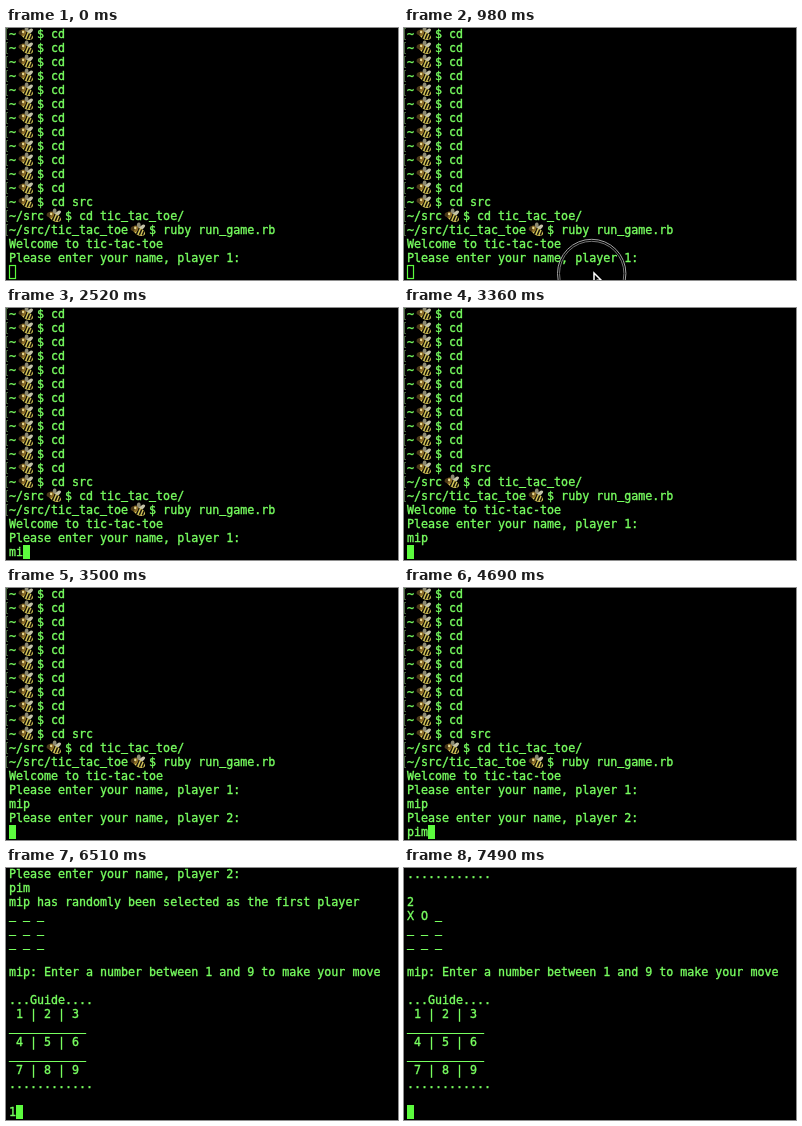
Animation of 392x252 px, one loop 8 s. Source, as an HTML page with a canvas:

```html
<!DOCTYPE html>
<html lang="en">
<head>
<meta charset="utf-8">
<title>Tic-tac-toe in a terminal</title>
<style>
  html, body { margin: 0; width: 100%; height: 100%; overflow: hidden; background: #000; }
  canvas { display: block; width: 392px; height: 252px; }
</style>
</head>
<body>
<canvas id="screen"></canvas>
<script>
const LOOP = 8000, ROWS = 18, CELL = 7.01, LINE = 14, LEFT = 2.9;
const GREEN = '#78ff60', CURSOR = '#5cfb3e';
const ONE = 'mip', TWO = 'pim';

const canvas = document.getElementById('screen');
const ctx = canvas.getContext('2d');
const ratio = window.devicePixelRatio || 1;
canvas.width = 392 * ratio;
canvas.height = 252 * ratio;
ctx.scale(ratio, ratio);

// '@' stands for the bee, two cells wide
const prompt = (dir, command) => `${dir}@ $ ${command}\n`;
const ask = n => `Please enter your name, player ${n}:\n`;
const guide = `...Guide....
 1 | 2 | 3
___________
 4 | 5 | 6
___________
 7 | 8 | 9
............

`;
const turn = (name, firstRow) =>
  `${firstRow}\n_ _ _\n_ _ _\n\n${name}: Enter a number between 1 and 9 to make your move\n\n${guide}`;

// What is added to the terminal, and when
const output = [
  [0, prompt('~', 'cd').repeat(12) + prompt('~', 'cd src') +
      prompt('~/src', 'cd tic_tac_toe/') +
      prompt('~/src/tic_tac_toe', 'ruby run_game.rb') +
      'Welcome to tic-tac-toe\n' + ask(1)],
  [2170, ONE[0]], [2450, ONE[1]], [2870, ONE[2]], [3220, '\n'],
  [3430, ask(2)],
  [4270, TWO[0]], [4480, TWO[1]], [4690, TWO[2]], [4900, '\n'],
  [5040, `${ONE} has randomly been selected as the first player\n` + turn(ONE, '_ _ _')],
  [6370, '1'], [6650, '\n'],
  [6720, turn(TWO, 'X _ _')],
  [7280, '2'],
  [7490, '\n' + turn(ONE, 'X O _')]
];

function ellipse(color, x, y, rx, ry, angle = 0) {
  ctx.fillStyle = color;
  ctx.beginPath();
  ctx.ellipse(x, y, rx, ry, angle, 0, 7);
  ctx.fill();
}

function bee(x, y) {
  ctx.save();
  ctx.translate(x + 10, y + 7);
  ctx.rotate(0.4);
  ellipse('#8d8a72', -1, -3.8, 2, 3.6, -0.3);
  ellipse('#c4c2a8', 2.6, -4, 1.8, 3.6, 0.5);
  ellipse('#d9c95a', 2, 1.2, 6, 3.6);
  ctx.fillStyle = '#15120a';
  for (const sx of [-0.6, 2.4, 5.2]) ctx.fillRect(sx, -2.2 + sx * 0.15, 1.5, 6.8 - sx * 0.4);
  ellipse('#8a6a26', -3, 0, 2.8, 3.2);
  ellipse('#4a3818', -5.4, 0.8, 2, 2.4);
  ellipse('#e8dc96', -3.4, -0.8, 1.2, 1.2);
  ctx.restore();
}

function bracket(y) {
  ctx.fillStyle = '#48643f';
  ctx.fillRect(0, y + 1, 1, 12);
  ctx.fillRect(1, y + 1, 1, 1);
  ctx.fillRect(1, y + 12, 1, 1);
}

function drawLine(text, top) {
  let col = 0;
  if (text.includes('@')) bracket(top);
  for (const ch of text) {
    const x = LEFT + col * CELL;
    if (ch === '@') {
      bee(x, top);
      col++;
    } else {
      const y = top + (ch === '_' ? 9.9 : 11);
      ctx.fillStyle = ctx.strokeStyle = GREEN;
      ctx.lineWidth = 0.35;
      ctx.fillText(ch, x, y);
      ctx.strokeText(ch, x, y);
    }
    col++;
  }
  return LEFT + col * CELL;
}

function drawCursor(x, top, focused) {
  if (focused) {
    ctx.fillStyle = CURSOR;
    ctx.fillRect(Math.round(x), top, 7, LINE);
  } else {
    ctx.strokeStyle = CURSOR;
    ctx.lineWidth = 1.2;
    ctx.strokeRect(Math.round(x) + 0.5, top + 0.5, 6, 13);
  }
}

function ring(r, color) {
  ctx.strokeStyle = color;
  ctx.lineWidth = 1;
  ctx.beginPath();
  ctx.arc(187.7, 245.5, r, 0, 7);
  ctx.stroke();
}

function drawPointer(t) {
  if (t < 70 || t >= 2170) return;
  const p = Math.min(1, (t - 70) / 770);
  const y = 245 + 35 * (1 - p) ** 2;
  if (t >= 910 && t < 1470) {
    ctx.globalAlpha = Math.min(1, (1470 - t) / 280);
    ring(34.2, '#a4a4a4');
    ring(32.2, '#777');
    ctx.globalAlpha = 1;
  }
  ctx.save();
  ctx.translate(190, y);
  ctx.fillStyle = '#000';
  ctx.strokeStyle = '#fff';
  ctx.lineWidth = 1.5;
  ctx.beginPath();
  for (const [px, py] of [[0, 0], [0, 10], [2.4, 7.8], [4, 11.5], [5.6, 10.8], [4, 7.2], [7, 7]]) ctx.lineTo(px, py);
  ctx.closePath();
  ctx.fill();
  ctx.stroke();
  ctx.restore();
}

function draw(now) {
  const t = now % LOOP;
  const log = output.filter(([at]) => at <= t).map(([, text]) => text).join('');
  ctx.fillStyle = '#000';
  ctx.fillRect(0, 0, 392, 252);
  ctx.font = '11.66px "DejaVu Sans Mono", monospace';
  let end = LEFT;
  log.split('\n').slice(-ROWS).forEach((text, row) => {
    end = drawLine(text, row * LINE - 1);
  });
  drawCursor(end, (ROWS - 1) * LINE - 1, t >= 1050);
  drawPointer(t);
  requestAnimationFrame(draw);
}
requestAnimationFrame(draw);
</script>
</body>
</html>
```
